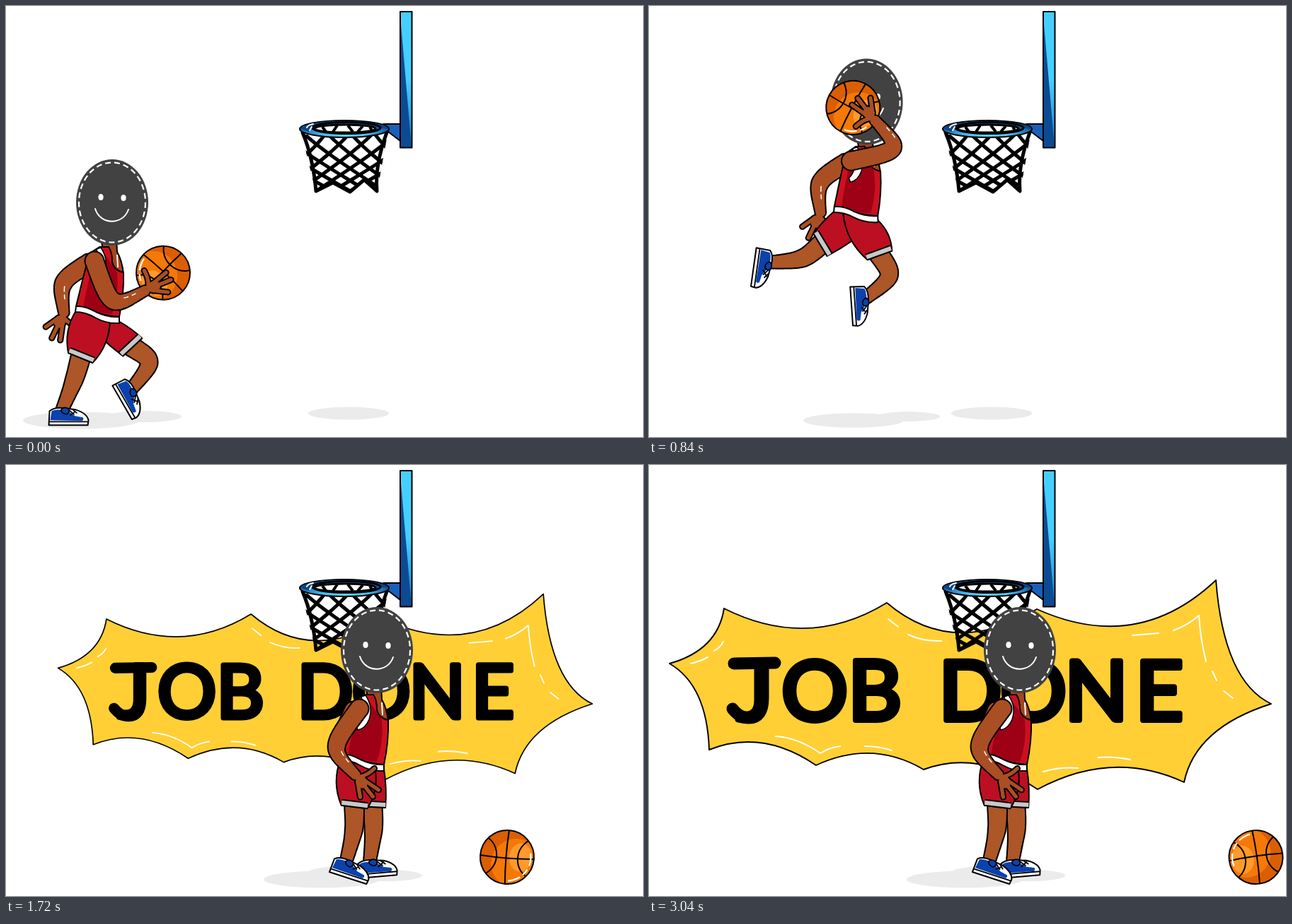
Recreate the animation shown at these times as an HTML page with a canvas. Size 900 px wide and 610 px high, loop 4.24 s.

```html
<!DOCTYPE html>
<html lang="en">
<head>
<meta charset="utf-8">
<title>Job done</title>
<style>
html, body { margin: 0; width: 100%; height: 100%; overflow: hidden; background: #fff; }
canvas { display: block; width: 100vw; height: 100vh; }
</style>
</head>
<body>
<canvas id="stage" width="900" height="610" role="img" aria-label="A basketball player dunks. JOB DONE"></canvas>
<script>
const ctx = document.getElementById('stage').getContext('2d');
const LOOP = 4240, STEP = 40, INK = '#000';
const ARM = '#aa4f23', LEG = '#ad5627', RED = '#bd0f22', GROUND = '#ebebeb';
const RELEASE = 1000, LANDING = 1240, ROLL = 1720;

const rad = deg => deg * Math.PI / 180;
const mix = (a, b, u) => a + (b - a) * u;
const clamp = u => Math.max(0, Math.min(1, u));
const easeOut = u => 1 - (1 - clamp(u)) ** 2;
// Point at a distance and angle from another
const reach = ([x, y], length, deg) => [x + length * Math.cos(rad(deg)), y + length * Math.sin(rad(deg))];
// Point given in a frame that is moved and turned
function inFrame([x, y], deg, dx, dy) {
  const c = Math.cos(rad(deg)), s = Math.sin(rad(deg));
  return [x + dx * c - dy * s, y + dx * s + dy * c];
}

// Limb angles in degrees. arm, rear: upper, fore; near, far: thigh, shin, foot.
// turn tilts the trunk, lead moves the near hip ahead of the far one.
const run = { turn: 0, lead: -11, arm: [66, -20], rear: [143, 88], near: [106, 112, 0], far: [41, 125, 60] };
const leap = { ...run, turn: -8, lead: 11, arm: [-3, -125], near: [64, 138, 86], far: [143, 174, 98] };
const glide = { ...leap, turn: -2, arm: [-16, -125] };
const dunk = { ...leap, turn: 8, arm: [-35, -57] };
const land = { ...run, turn: 12, lead: -3, arm: [134, 20], near: [20, 122, 16], far: [3, 113, 3] };
const stand = { ...run, arm: [122, 54], rear: [110, 70], near: [91, 104, 18], far: [87, 97, -5] };

const moves = [
  { t: 0, x: 130, y: 432, shade: 106, ...run },
  { t: 560, x: 257, y: 327, shade: 262, ...leap },
  { t: 840, x: 293, y: 290, shade: 289, ...glide },
  { t: RELEASE, x: 388, y: 262, shade: 370, ...dunk },
  { t: LANDING, x: 453, y: 470, shade: 446, ...land },
  { t: 1600, x: 504, y: 416, shade: 446, ...stand }
];

function blend(a, b, u) {
  if (typeof a === 'number') return mix(a, b, u);
  if (Array.isArray(a)) return a.map((v, i) => mix(v, b[i], u));
  return Object.fromEntries(Object.keys(a).map(key => [key, blend(a[key], b[key], u)]));
}
function poseAt(t) {
  const i = moves.findIndex(m => m.t > t);
  if (i < 0) return moves[moves.length - 1];
  const a = moves[i - 1], b = moves[i];
  return blend(a, b, (t - a.t) / (b.t - a.t));
}

const shoulderOf = p => inFrame([p.x, p.y], p.turn, -5, -71);
function armJoints(shoulder, upper, fore, [a, b]) {
  const elbow = reach(shoulder, upper, a);
  return [shoulder, elbow, reach(elbow, fore, b)];
}
const nearArm = p => armJoints(shoulderOf(p), 64, 48, p.arm);

// The ball sits in the hand, drops through the net, bounces once and rolls out.
function heldBall(p) {
  const wrist = nearArm(p)[2];
  return [...inFrame(wrist, p.arm[1], 33, -15), p.arm[1] - 27];
}
function ballAt(t) {
  if (t <= RELEASE) return heldBall(poseAt(t));
  let x, y;
  if (t <= LANDING) {
    const u = (t - RELEASE) / (LANDING - RELEASE);
    const [x0, y0] = heldBall(poseAt(RELEASE));
    x = mix(x0, 512, u * u);
    y = mix(y0, 543, u ** 1.5);
  } else if (t <= ROLL) {
    const u = (t - LANDING) / (ROLL - LANDING);
    x = mix(512, 708, u);
    y = mix(543, 555, u) - 500 * u * (1 - u);
  } else {
    x = mix(708, 857.5, easeOut((t - ROLL) / 935));
    y = 555;
  }
  return [x, y, 1.12 * (x - 512) - 35];
}

function bannerScale(t) {
  return t < 1980 ? 1.052 * easeOut((t - 1272) / 740) : mix(1.05, 1, clamp((t - 1980) / 100));
}

function paint(fill, line, width = 2) {
  if (fill) { ctx.fillStyle = fill; ctx.fill(); }
  if (line) { ctx.strokeStyle = line; ctx.lineWidth = width; ctx.stroke(); }
}
function shape(d, fill, line, width = 2) {
  const path = new Path2D(d);
  if (fill) { ctx.fillStyle = fill; ctx.fill(path); }
  if (line) { ctx.strokeStyle = line; ctx.lineWidth = width; ctx.stroke(path); }
}
function oval(x, y, rx, ry, fill, line, width) {
  ctx.beginPath();
  ctx.ellipse(x, y, rx, ry, 0, 0, 7);
  paint(fill, line, width);
}
function placed([x, y], deg, draw) {
  ctx.save();
  ctx.translate(x, y);
  ctx.rotate(rad(deg));
  draw();
  ctx.restore();
}

// Tapered limb through a, b, c as a row of [x, y, radius] discs
function limbDiscs(a, b, c, radii) {
  const bend = [0, 1].map(k => mix((a[k] + c[k]) / 2, b[k], 1.25));
  return Array.from({ length: 41 }, (_, i) => {
    const u = i / 40, v = 1 - u;
    const at = k => v ** 3 * a[k] + 3 * u * v * bend[k] + u ** 3 * c[k];
    const r = u < .5 ? mix(radii[0], radii[1], u * 2) : mix(radii[1], radii[2], u * 2 - 1);
    return [at(0), at(1), r];
  });
}
function fillDiscs(discs, grow, color) {
  ctx.beginPath();
  for (const [x, y, r] of discs) {
    ctx.moveTo(x + r + grow, y);
    ctx.arc(x, y, r + grow, 0, 7);
  }
  paint(color);
}

function hand(grow, color) {
  ctx.lineCap = 'round';
  oval(14, -1, 10 + grow, 9 + grow, color);
  shape('M12-5L37-14M14-1L40-2M12 4L30 13M7-5Q11-14 9-27', null, color, 7.2 + 2 * grow);
}
function arm(joints, turn) {
  const discs = limbDiscs(...joints, [13.5, 12.5, 8]);
  for (const [grow, color] of [[1, INK], [-1, ARM]]) {
    fillDiscs(discs, grow, color);
    placed(joints[2], turn, () => hand(grow, color));
  }
  ctx.beginPath();
  for (const [x, y, r] of discs.slice(27, 36)) ctx.lineTo(x + r * .35, y - r * .5);
  ctx.setLineDash([7, 5]);
  paint(null, '#fff', 1.5);
  ctx.setLineDash([]);
}

function shoe() {
  shape('M0 0L1-20Q8-26 22-24L38-22Q54-17 56-7L55 0Z', '#fff', INK);
  shape('M2-7L4-20Q12-24 27-20L37-13L48-11Q50-8 47-6Z', '#0b42ad');
  shape('M17-21Q20-27 27-24Q31-20 26-16Q20-15 17-21Z', '#0b42ad', INK, 1.6);
  shape('M1-5H55M29-21L36-15M34-22L40-17M30-14L38-20', null, INK, 1.8);
}

function bulgeTo([x0, y0], [x1, y1], bulge) {
  ctx.quadraticCurveTo((x0 + x1) / 2 - (y1 - y0) * bulge, (y0 + y1) / 2 + (x1 - x0) * bulge, x1, y1);
}
// One leg with its half of the shorts; the hem lies across the thigh.
function leg(p, [thigh, shin, foot], lead, left, right, bulge) {
  const hip = [p.x + lead, p.y + 18];
  const knee = reach(hip, 83, thigh), ankle = reach(knee, 47, shin);
  const cuff = reach(hip, 50, thigh);
  const discs = limbDiscs(cuff, knee, ankle, [14, 12.5, 9]);
  fillDiscs(discs, 1, INK);
  fillDiscs(discs, -1, LEG);
  placed(ankle, foot, () => { ctx.translate(-18, 20); shoe(); });

  const across = thigh - 84;
  const hemL = reach(cuff, -18.5, across), hemR = reach(cuff, 18.5, across);
  const belt = x => inFrame([p.x, p.y], p.turn, x, 7 + x / 4);
  const a = belt(left), b = belt(right);
  ctx.beginPath();
  ctx.moveTo(...a);
  bulgeTo(a, hemL, bulge);
  ctx.lineTo(...hemR);
  bulgeTo(hemR, b, bulge);
  ctx.closePath();
  paint(RED, INK);
  ctx.lineCap = 'butt';
  for (const [color, width] of [[INK, 10], ['#c9c9c9', 6]]) {
    ctx.beginPath();
    for (const end of [hemL, hemR]) ctx.lineTo(...reach(end, -4, across + 90));
    paint(null, color, width);
  }
}

function torso() {
  shape('M4-104L26-104L27-84Q34-72 36-53L14-48Z', '#a2461d', INK);
  shape('M27-80L28-62', null, '#fff', 2);
  shape('M2-91L15-91Q20-84 20-70Q22-58 36-55Q37-25 30 8Q5 6-31-7Q-22-45-12-82Z', '#cb1020', INK);
  shape('M6-86Q17-70 27-55Q30-24 20 4Q0 3-21-6Q-14-42-4-80Z', '#9e0016');
  shape('M4-90Q15-74 9-56Q4-43-7-41L-9-47Q5-58-2-88Z', '#fff', INK, 1.5);
  shape('M-31-7Q-18-8-3 1Q14 9 30 8L30 17Q12 18-4 9Q-18 1-32 1Z', '#fff', INK);
}

function face() {
  oval(0, 0, 51, 61, '#424242');
  ctx.setLineDash([8, 5]);
  ctx.lineCap = 'butt';
  oval(0, 0, 47, 56.5, null, '#fff', 2.2);
  ctx.setLineDash([]);
  for (const side of [-1, 1]) oval(16 * side, side / 2 - 7, 3.6, 4.5, '#fff');
  ctx.lineCap = 'round';
  shape('M-24 9C-17 32 15 33 23 10', null, '#fff', 2);
}

function ball(t) {
  const [x, y, spin] = ballAt(t);
  placed([x, y], spin, () => {
    oval(0, 0, 38, 38, '#db5e02');
    ctx.save();
    ctx.clip();
    oval(-13, -8, 35, 35, '#f47908');
    oval(-19, 1, 16, 20, '#ff9a2b');
    for (const side of [-1, 1]) oval(42 * side, 0, 27, 29, null, INK, 2);
    shape('M-39 0Q0-3 39 0M0-39Q3 0 0 39', null, INK, 2);
    ctx.restore();
    ctx.setLineDash([18, 6, 10, 5]);
    ctx.beginPath();
    ctx.arc(0, 0, 33.5, 2.9, 4.6);
    paint(null, '#fff', 2.2);
    ctx.setLineDash([]);
    oval(0, 0, 38, 38, null, INK, 2);
  });
}

function net() {
  ctx.save();
  ctx.clip(new Path2D('M418 182H539L524 264L506 248L486 264L462 252L438 264Z'));
  ctx.lineCap = 'butt';
  for (let k = 0; k < 7; k++) {
    for (const way of [-1, 1]) {
      ctx.beginPath();
      for (let v = -.1; v < 1.1; v += .1) {
        const u = (way > 0 ? -.82 : -.02) + .28 * k + way * (.6 * v + .5 * v * v);
        ctx.lineTo(mix(420 + 118 * u, 438 + 86 * u, v), 182 + 80 * v);
      }
      paint(null, INK, 5);
    }
  }
  ctx.restore();
  ctx.lineCap = 'round';
  shape('M419 179Q434 215 438 262L462 250L486 263L506 246L524 262Q521 225 538 179', null, INK, 5);
}

function gradient(x, y, ...colors) {
  const g = ctx.createLinearGradient(...x, ...y);
  colors.forEach((color, i) => g.addColorStop(i / (colors.length - 1), color));
  return g;
}

function hoop() {
  shape('M533 167H557V191L540 178Z', '#1a5fb9', INK);
  shape('M557 8H573.5V200.5H557Z', gradient([0, 8], [0, 200], '#45cfff', '#45cfff', '#1f7fc8'));
  shape('M557 14L573 200H557Z', '#0c4b93');
  shape('M557 8H573.5V200.5H557Z', null, INK);
  net();
  oval(478, 174, 63, 12, gradient([415, 0], [541, 0], '#1b62ab', '#48b8ee', '#62d4ff', '#4cc4f8', '#12519b'), INK);
  shape('M416 174A62 11 0 0 1 540 174L525 173A46 7 0 0 0 433 173L428 178Z', '#0d4585');
  oval(481, 172.5, 48, 8, '#14589f', INK, 3);
  oval(479, 173.5, 43, 5.6, '#fff', INK, 3);
  ctx.lineCap = 'butt';
  shape('M447 171L452 178M468 169L462 178M483 169L490 178M504 170L497 178M514 171L517 176', null, INK, 4);
  ctx.lineCap = 'round';
  shape('M425 172Q427 168 434 167M429 176L432 171', null, '#fff', 2);
}

function banner(t) {
  const k = bannerScale(t);
  if (k <= 0) return;
  ctx.save();
  ctx.translate(427, 338);
  ctx.scale(k, k);
  ctx.translate(-427, -338);
  shape('M29 281Q97 262 106 203Q225 263 336 195Q430 275 548 204Q690 268 801 163' +
    'Q812 306 879 338Q772 372 756 449Q655 402 549 459Q465 402 388 431' +
    'Q315 388 236 425Q160 373 85 403Q82 312 29 281Z', '#ffcf35', INK, 1.9);
  ctx.lineCap = 'round';
  shape('M59 281Q72 278 83 272M92 263Q101 258 105 250M338 218L352 229M366 240Q388 250 413 249' +
    'M683 241L720 238M741 234Q761 227 777 213Q779 246 787 278M796 292L802 305M812 320L825 330' +
    'M179 384Q211 386 242 408Q254 400 270 398M305 398Q325 398 343 404' +
    'M557 434Q582 427 606 429M634 414Q658 412 680 417', null, '#fff', 2);
  ctx.font = '117px Lato, sans-serif';
  ctx.textAlign = 'center';
  ctx.fillStyle = ctx.strokeStyle = INK;
  ctx.lineWidth = 8;
  const write = (word, x, pitch) => [...word].forEach((letter, i) => {
    ctx.fillText(letter, x + pitch * i, 361);
    ctx.strokeText(letter, x + pitch * i, 361);
  });
  write('JOB', 149, 85);
  write('DONE', 454, 89);
  // wide top bar and long hook of the J
  shape('M120 281L178 280M161 284V330Q161 358 141 358Q128 358 118 345', null, INK, 17);
  ctx.restore();
}

function shadows(p) {
  const size = 1 - .14 * clamp((432 - p.y) / 140) * (p.t < LANDING);
  oval(484, 576.5, 57, 9, GROUND);
  oval(p.shade, 586.5, 82 * size, 12 * size, GROUND);
  oval(p.shade + 90 * size, 581, 52 * size, 8 * size, GROUND);
}

function render(t) {
  const p = poseAt(t);
  ctx.fillStyle = '#fff';
  ctx.fillRect(0, 0, 900, 610);
  ctx.lineJoin = 'round';
  shadows(p);
  banner(t);
  const inNet = t > RELEASE && t < 1140;
  if (inNet) ball(t);
  hoop();

  const [sx, sy] = shoulderOf(p);
  arm(armJoints([sx - 8, sy + 3], 46, 42, p.rear), p.rear[1] + 30);
  leg(p, p.far, -p.lead, -31, 30, .06);
  leg(p, p.near, p.lead, -25 + .55 * p.lead, 23.5 + .6 * p.lead, .2);
  placed([p.x, p.y], p.turn, torso);
  placed(inFrame([p.x, p.y], p.turn, 20, -154), p.turn * .9, face);
  if (t <= RELEASE) ball(t);
  arm(nearArm(p), p.arm[1]);
  if (t > RELEASE && !inNet) ball(t);
}

const begin = performance.now();
function tick(now) {
  const t = Math.max(0, now - begin) % LOOP;
  render(Math.floor(t / STEP) * STEP);
  requestAnimationFrame(tick);
}
render(0);
requestAnimationFrame(tick);
</script>
</body>
</html>
```
